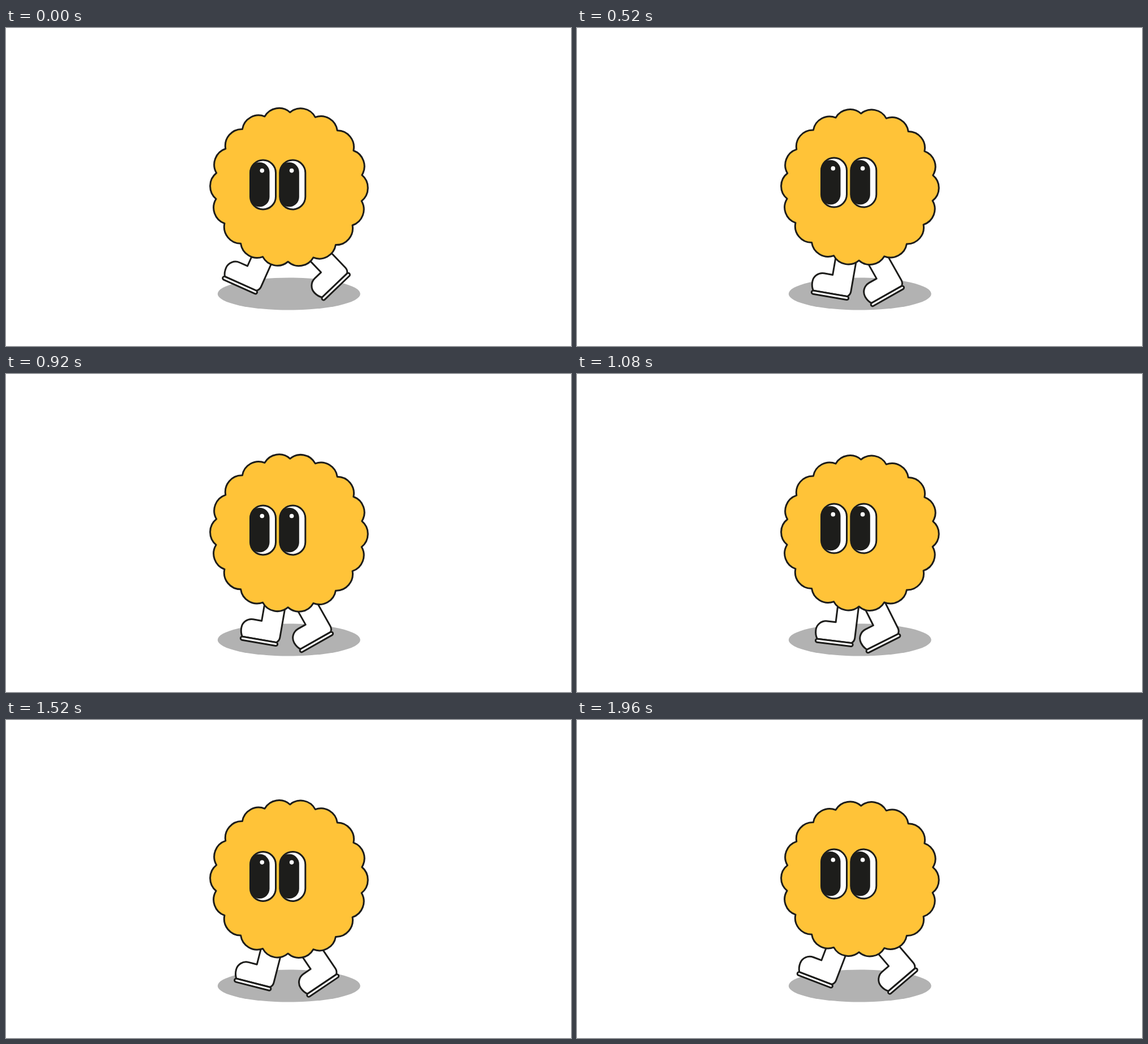
Recreate the animation shown at these times as an HTML page. Size 998 px wide and 561 px high, loop 2000 ms.

```html
<!DOCTYPE html>
<html lang="en">
<head>
<meta charset="utf-8">
<title>Walking biscuit</title>
<style>
  html, body { margin: 0; width: 100%; height: 100%; overflow: hidden; background: #fff; }
  svg { display: block; width: 100%; height: 100%; }
  .line { stroke: #1d1d1b; stroke-width: 3; stroke-linejoin: round; stroke-linecap: round; }
</style>
</head>
<body>
<svg viewBox="0 0 998 561">
  <defs>
    <!-- The origin is the hip, the boot hangs below it. -->
    <g id="leg" class="line" fill="#fff">
      <path d="M-30 60V115.3H-45.3A18 18 0 0 0 -63.3 133.3C-63.3 139 -62 144 -59 148.5H2Q6.8 145 6.8 139V60"/>
      <rect x="-61.5" y="148.5" width="66.2" height="6" rx="3"/>
    </g>
    <g id="eye">
      <rect class="line" x="1.5" y="233" width="45" height="87" rx="22.5" fill="#fff"/>
      <rect x="0.5" y="237" width="35" height="78.5" rx="17.5" fill="#1d1d1b"/>
      <circle cx="22.3" cy="251.6" r="3.8" fill="#fff"/>
    </g>
  </defs>
  <ellipse cx="499.8" cy="469" rx="126" ry="28.5" fill="#b2b2b2"/>
  <use id="rear" href="#leg"/>
  <use id="front" href="#leg"/>
  <path id="body" class="line" fill="#ffc338"/>
  <g id="eyes">
    <use href="#eye" x="430"/>
    <use href="#eye" x="482.3"/>
  </g>
</svg>
<script>
  const LOOP = 2000, STEP = 40, STRIDE = 400, BOB = 800;
  const SCALLOPS = 18, NOTCH_RADIUS = 130.5, ARC_RADIUS = 29.2;
  const [rear, front, body, eyes] =
    ["rear", "front", "body", "eyes"].map(id => document.getElementById(id));

  const wave = (time, period) => Math.cos(2 * Math.PI * time / period);
  const place = (node, transform) => node.setAttribute("transform", transform);

  function scallopedDisc() {
    let path = "";
    for (let i = 0; i <= SCALLOPS; i++) {
      const angle = 2 * Math.PI * i / SCALLOPS + 0.014;
      const x = (NOTCH_RADIUS * Math.sin(angle)).toFixed(2);
      const y = (-NOTCH_RADIUS * Math.cos(angle)).toFixed(2);
      path += i ? `A${ARC_RADIUS} ${ARC_RADIUS} 0 0 1 ${x} ${y}` : `M${x} ${y}`;
    }
    return path + "Z";
  }

  function draw(time) {
    const swing = 12.05 * (1 - wave(time - 8, STRIDE));
    const bob = wave(time, BOB);
    place(front, `translate(501 327) rotate(${24.2 - swing})`);
    place(rear, `translate(498.5 327) rotate(${swing - 43.8})`);
    place(body, `translate(499.9 280.5) scale(1 ${0.999 + 0.0105 * bob})`);
    place(eyes, `translate(0 ${2.5 * (bob - 1)})`);
  }

  function tick() {
    const time = performance.now() % LOOP;
    draw(Math.floor(time / STEP) * STEP);
    requestAnimationFrame(tick);
  }

  body.setAttribute("d", scallopedDisc());
  tick();
</script>
</body>
</html>
```
